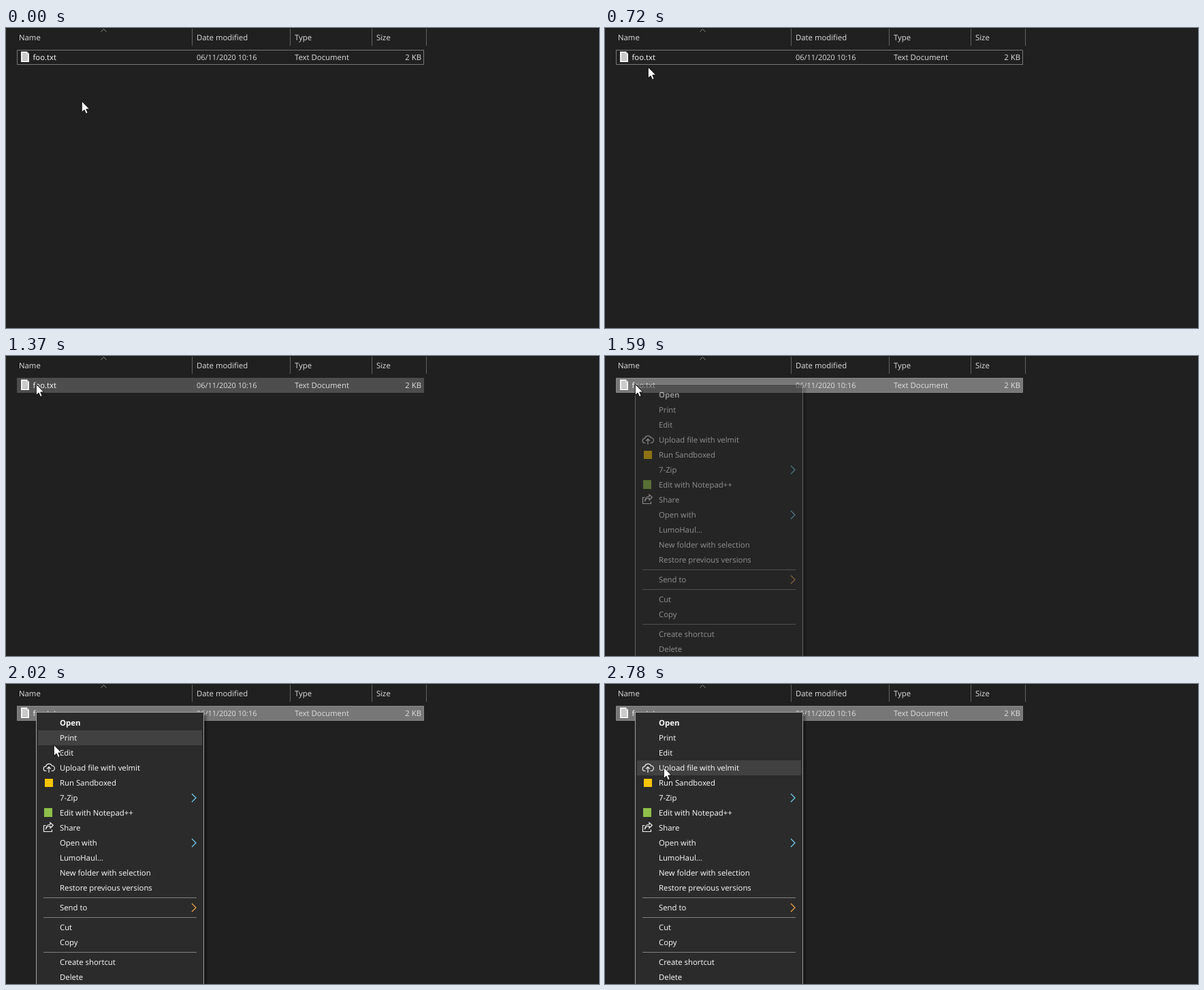
These frames come from a looping animation (871 by 440 pixels, 4280 ms). An HTML page:

```html
<!DOCTYPE html>
<html lang="en">
<head>
<meta charset="utf-8">
<title>File context menu</title>
<style>
html, body { margin: 0; width: 100%; height: 100%; overflow: hidden; background: #202020; }
svg { display: block; width: 871px; height: 440px; }
text { font: 11.35px "Open Sans", "Noto Sans", sans-serif; fill: #fff; text-rendering: geometricPrecision; white-space: pre; }
.head text, .cell { fill: #dedede; }
.date { font-size: 10.9px; }
.bold { font-weight: 700; }
.icon { fill: none; stroke: #f2f2f2; stroke-width: 1.2; }
.crisp { shape-rendering: crispEdges; }
</style>
</head>
<body>
<svg viewBox="0 0 871 440" xmlns="http://www.w3.org/2000/svg">
  <defs>
    <linearGradient id="shade">
      <stop offset="0" stop-color="#000" stop-opacity=".45"/>
      <stop offset="1" stop-color="#000" stop-opacity="0"/>
    </linearGradient>
  </defs>
  <rect width="871" height="440" fill="#202020"/>
  <path class="crisp" d="M0 .5H871M870.5 0V440" stroke="#171717"/>

  <g class="head">
    <path class="crisp" d="M273.5 1V26M417.5 1V26M537.5 1V26M617.5 1V26" stroke="#636363"/>
    <path d="M139.5 5.5l4-4 4 4" fill="none" stroke="#8c8c8c"/>
    <text x="19" y="18">Name</text>
    <text x="280" y="18">Date modified</text>
    <text x="424" y="18">Type</text>
    <text x="544" y="18">Size</text>
  </g>

  <rect id="row" class="crisp" x="16.5" y="32.5" width="597" height="21"/>
  <g>
    <path d="M22 34.5h9l3 3v12.500h-12z" fill="#f4f4f4"/>
    <path d="M31 34.500v3h3z" fill="#a8a8a8"/>
    <path d="M24 37.500h6M24 39.500h8M24 41.500h8M24 43.500h8M24 45.500h8M24 47.500h8" stroke="#8b8b8b" stroke-width=".8"/>
    <text x="39.500" y="47">foo.txt</text>
    <text class="cell date" x="280" y="47">06/11/2020 10:16</text>
    <text class="cell" x="424" y="47">Text Document</text>
    <text class="cell" x="610" y="47" text-anchor="end">2 KB</text>
  </g>

  <g id="menu">
    <rect x="291" y="44" width="6" height="396" fill="url(#shade)"/>
    <rect class="crisp" x="44.500" y="41.500" width="246" height="420" fill="#2b2b2b" stroke="#a0a0a0"/>
    <rect id="hover" class="crisp" x="47" width="241" height="22" fill="#414141"/>
    <path class="crisp" d="M55 313.500H280M55 342.500H280M55 393.500H280" stroke="#808080"/>
    <g id="items"></g>
    <path class="icon" d="M59.500 127.500h-1a3.300 3.300 0 0 1 0-6.600a4.800 4.800 0 0 1 9-1a3.800 3.800 0 0 1 .2 7.600h-1.200M63 130v-8M60 124.700l3-3 3 3"/>
    <rect x="57" y="139" width="12" height="12" fill="#f7c600"/>
    <rect x="56" y="182" width="12" height="13" fill="#8fc04a"/>
    <path class="icon" d="M58.500 207.500h-3v9h12v-3M58.500 213.500c.5-3.500 3-5 6.500-5v2.800l4.300-4-4.300-4v2.700c-4 0-6.500 3-6.500 7.500z"/>
  </g>

  <path id="cursor" d="M.3 .3V16.500L4 13 6.500 18.700 9.200 17.500 6.800 12H11.700Z" fill="#fff" stroke="#000" stroke-width=".9"/>
</svg>
<script>
const NS = "http://www.w3.org/2000/svg";
const LOOP = 4280;
const byId = id => document.getElementById(id);
const row = byId("row"), menu = byId("menu"), hover = byId("hover");
const items = byId("items"), cursor = byId("cursor");

function add(tag, attrs, label = "") {
  const node = document.createElementNS(NS, tag);
  for (const key in attrs) node.setAttribute(key, attrs[key]);
  node.textContent = label;
  items.append(node);
}

// Menu groups: first text centre, then labels 22 px apart.
const groups = [
  [57, "Open", "Print", "Edit", "Upload file with velmit", "Run Sandboxed", "7-Zip",
    "Edit with Notepad++", "Share", "Open with", "LumoHaul...",
    "New folder with selection", "Restore previous versions"],
  [328, "Send to"],
  [357, "Cut", "Copy"],
  [408, "Create shortcut", "Delete"]
];
const arrows = { "7-Zip": "#72d2f5", "Open with": "#72d2f5", "Send to": "#f2a648" };

for (const [top, ...labels] of groups) {
  labels.forEach((label, i) => {
    const y = top + i * 22;
    add("text", { x: 79, y: y + 4, class: label === "Open" ? "bold" : "" }, label);
    if (arrows[label]) {
      add("path", { d: `M273 ${y - 6}l6 6-6 6`, fill: "none", stroke: arrows[label], "stroke-width": 1.2 });
    }
  });
}

// Pointer steps: time, x, y.
const steps = [
  [0, 111, 107], [100, 110, 110], [200, 107, 111], [290, 100, 109], [390, 92, 105],
  [500, 82, 95], [610, 69, 76], [720, 63, 57], [830, 58, 46], [940, 54, 44],
  [1050, 50, 42], [1160, 46, 41], [1270, 44, 41], [1700, 46, 44], [1810, 50, 56],
  [1920, 61, 74], [2020, 70, 89], [2140, 77, 102], [2240, 83, 115], [2350, 86, 122]
];

const rowStyles = {
  focus: ["none", "#777777"],
  hover: ["#4d4d4d", "#4d4d4d"],
  selected: ["#777777", "#858585"]
};

function draw(t) {
  const [, x, y] = steps.findLast(step => step[0] <= t);
  cursor.setAttribute("transform", `translate(${x} ${y})`);

  const [fill, stroke] = rowStyles[t < 830 ? "focus" : t < 1480 ? "hover" : "selected"];
  row.setAttribute("fill", fill);
  row.setAttribute("stroke", stroke);

  menu.setAttribute("opacity", t < 1590 ? 0 : t < 1700 ? 0.5 : t < 1810 ? 0.92 : 1);
  const index = Math.floor((y - 46) / 22);
  hover.setAttribute("visibility", index >= 0 ? "visible" : "hidden");
  hover.setAttribute("y", 46 + index * 22);
}

const start = performance.now();
function tick() {
  draw((performance.now() - start) % LOOP);
  requestAnimationFrame(tick);
}
tick();
</script>
</body>
</html>
```
